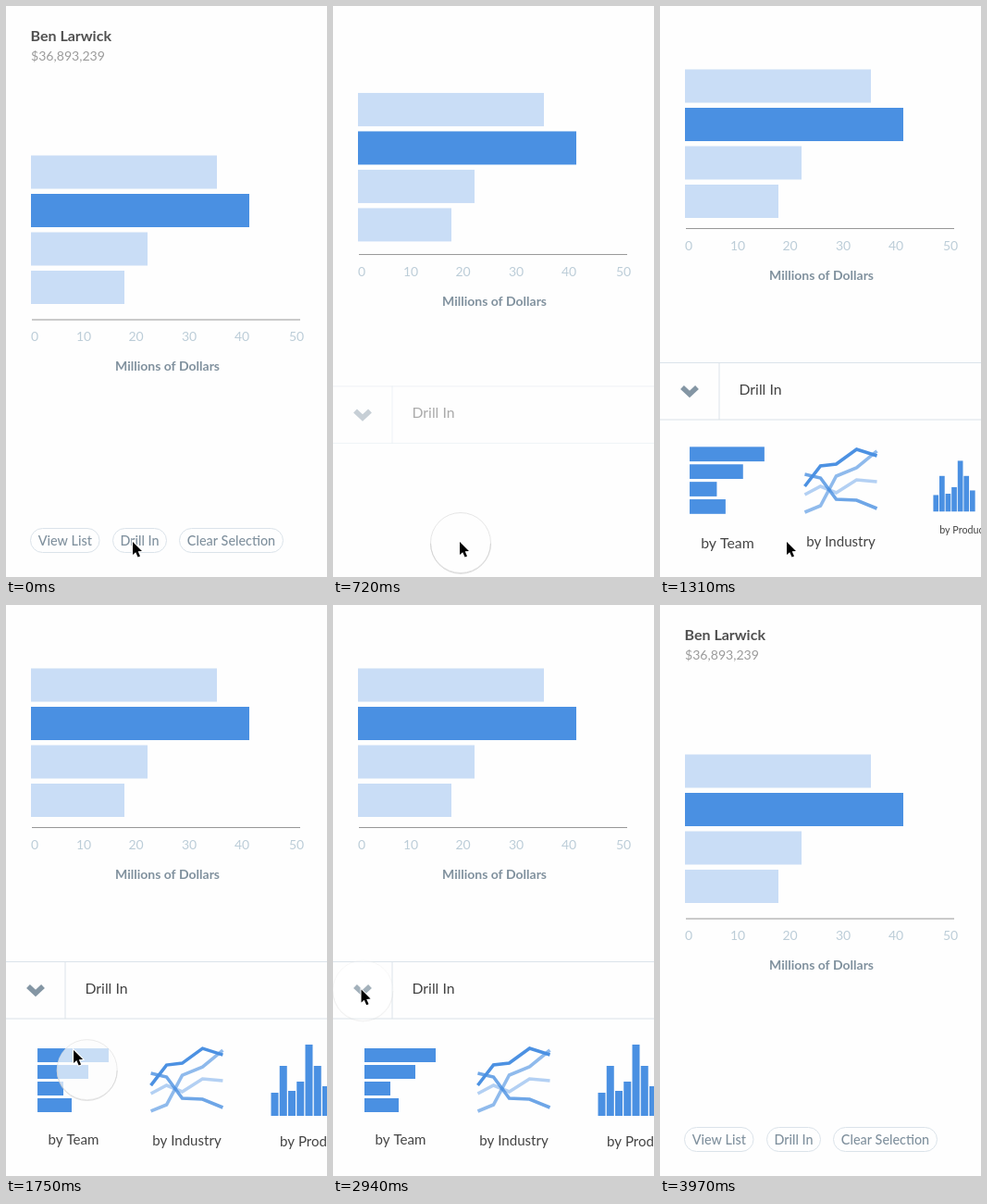
An HTML page with a canvas for the animation above (5100 ms loop, 347 px wide and 617 px high).

```html
<!DOCTYPE html>
<html lang="en">
<head>
<meta charset="utf-8">
<title>Drill-in chart</title>
<style>
html, body { margin: 0; height: 100%; overflow: hidden; background: #fefefe; }
canvas { display: block; }
</style>
</head>
<body>
<canvas width="347" height="617"></canvas>
<script>
const ctx = document.querySelector('canvas').getContext('2d');
const LOOP = 5100, OPEN = 507, DRAG = 1600, CLOSE = 3069, SLIDE = 600;
const WHITE = '#fefefe', BLUE = '#4a90e2', PALE = '#c9ddf6', SLATE = '#80919e', RULE = '#dbe3ea', INK = '#444';

const clamp = u => Math.min(1, Math.max(0, u));
const ramp = (t, start, duration) => clamp((t - start) / duration);
const easeOut = u => 1 - (1 - u) ** 3;
const glide = (t, start, tau) => Math.exp(-Math.max(0, t - start) / tau);
const pulse = (t, start, end, fade) => ramp(t, start, 40) * clamp((end - t) / fade);

// 0 on the home screen, 1 with the drill-in panel open.
const opened = (t, closeDelay = 0) =>
  easeOut(ramp(t, OPEN, SLIDE)) - easeOut(ramp(t, CLOSE + closeDelay, SLIDE));

// Underdamped spring from 0 to 1.
function spring(t) {
  const w = Math.PI / 340, damping = .95, u = w * Math.max(0, t);
  return 1 - Math.exp(-damping * u) * (Math.cos(u) + damping * Math.sin(u));
}

function text(str, x, y, size, color, align = 'left', weight = 400) {
  ctx.font = `${weight} ${size}px Lato, sans-serif`;
  ctx.textAlign = align;
  ctx.fillStyle = color;
  ctx.fillText(str, x, y);
}

function rect(x, y, w, h, color) {
  ctx.fillStyle = color;
  ctx.fillRect(x, y, w, h);
}

function stroke(width, color) {
  ctx.lineWidth = width;
  ctx.strokeStyle = color;
  ctx.stroke();
}

function path(points) {
  ctx.beginPath();
  points.forEach(([x, y]) => ctx.lineTo(x, y));
}

function layer(alpha, x, y, draw, scale = 1) {
  if (alpha <= 0 || scale <= 0) return;
  ctx.save();
  ctx.globalAlpha = alpha;
  ctx.translate(x, y);
  ctx.scale(scale, scale);
  draw();
  ctx.restore();
}

function chart(p) {
  const top = 161.5 - 93 * p, axis = top + 177.5 - 5.5 * p * p;
  [201, 236, 126, 101].forEach((w, i) => rect(27, top + 41.5 * i, w, 36, i === 1 ? BLUE : PALE));
  rect(28, axis - .5, 290, 1, '#979797');
  [31, 84, 140.5, 198, 255, 314].forEach((x, i) => text(i * 10, x, axis + 23, 14, '#bccdd8', 'center'));
  text('Millions of Dollars', 174.5, axis + 55, 14, SLATE, 'center', 700);
}

function header() {
  text('Ben Larwick', 26.5, 38, 16, '#505050', 'left', 700);
  text('$36,893,239', 27, 59, 14.1, '#9b9b9b');
}

function pill(label, x, w) {
  ctx.beginPath();
  ctx.roundRect(x, 564.5, w, 26, 13);
  stroke(1, RULE);
  text(label, x + w / 2, 583, 14.4, SLATE, 'center', 500);
}

function buttons() {
  pill('View List', 26.5, 74.5);
  pill('Drill In', 115.5, 58);
  pill('Clear Selection', 187.5, 112);
}

function panel() {
  rect(0, 385, 347, 1, RULE);
  rect(0, 446.5, 347, 1, RULE);
  rect(63.5, 385, 1, 62, RULE);
  path([[24, 412], [32, 419.5], [40, 412]]);
  stroke(5.6, '#8496a4');
  text('Drill In', 85.5, 420, 15.8, INK);
}

// Icons are drawn around the centre they grow from.
function teamIcon() {
  [77, 55, 28, 37].forEach((w, i) => rect(-39.5, -53 + 18 * i, w, 15, BLUE));
  text('by Team', -.5, 51, 15.1, INK, 'center');
}

function industryIcon() {
  const xs = [-39, -22, -5, 17, 39];
  const series = [[-4, -13, -6, -20, -18], [15, 8, -24, -33, -51], [-26, -22, 1, 2, 11], [-13, -35, -37, -53, -46]];
  series.forEach((ys, i) => {
    path(ys.map((y, j) => [xs[j], y]));
    stroke(3.6, `rgba(74,144,226,${.42 + .19 * i})`);
  });
  text('by Industry', 0, 52, 15.1, INK, 'center');
}

function productIcon() {
  [25, 54, 27, 37, 77, 54, 32].forEach((h, i) => rect(-31 + 9.25 * i, 20 - h, 8, h, BLUE));
  text('by Product', -21.5, 53, 15.1, INK);
}

function icons(t) {
  [teamIcon, industryIcon, productIcon].forEach((draw, i) => {
    const grow = spring(t - 955 - 100 * i);
    const shrink = (1 - ramp(t, 2970 + 40 * i, 250)) ** 2;
    layer(1, 73.5 + 122 * i, 532, draw, grow * shrink);
  });
}

function touch() {
  ctx.beginPath();
  ctx.arc(0, 0, 32.5, 0, 7);
  ctx.fillStyle = WHITE;
  ctx.fill();
  stroke(1, '#e2e2e2');
  ctx.beginPath();
  ctx.arc(0, .8, 32.5, 0, Math.PI);
  stroke(1, '#d2d2d2');
}

function cursor() {
  path([[0, 0], [0, 14], [3.2, 11.2], [5.6, 16.6], [8, 15.6], [5.7, 10.3], [10, 10]]);
  ctx.closePath();
  stroke(2, '#fff');
  ctx.fillStyle = '#000';
  ctx.fill();
}

function pointer(t) {
  const drag = glide(t, DRAG, 233), move = glide(t, DRAG - 15, 180);
  const tap = pulse(t, 540, 830, 80) + pulse(t, 3020, 3520, 290);
  const trail = pulse(t, DRAG, 3020, 250);
  layer(Math.max(.85 * tap, .7 * trail), 32 + 106 * drag, 416 + 164 * drag, touch);
  if (t < 3600) layer(1, 30.5 + 106.5 * move, 415.5 + 163.5 * move, cursor);
}

// The screen refreshes in steps of about 148 ms once the tap begins.
const hold = t => t < 561 ? 0 : 570 + 147.5 * Math.floor((t - 561) / 147.5);

function frame(now) {
  const t = hold(now % LOOP);
  const leave = ramp(t, 540, 120), home = 1 - leave + ramp(t, 3090, 130);
  const panelFade = ramp(t, 563, 350) - ramp(t, 3100, 420);
  rect(0, 0, 347, 617, WHITE);
  chart(opened(t));
  layer(home, 0, -24 * leave * (home < 1), header);
  layer(home, 0, 16 * leave * (home < 1), buttons);
  layer(panelFade, 0, 93 * (1 - opened(t, 23)), panel);
  icons(t);
  pointer(t);
  requestAnimationFrame(frame);
}
requestAnimationFrame(frame);
</script>
</body>
</html>
```
